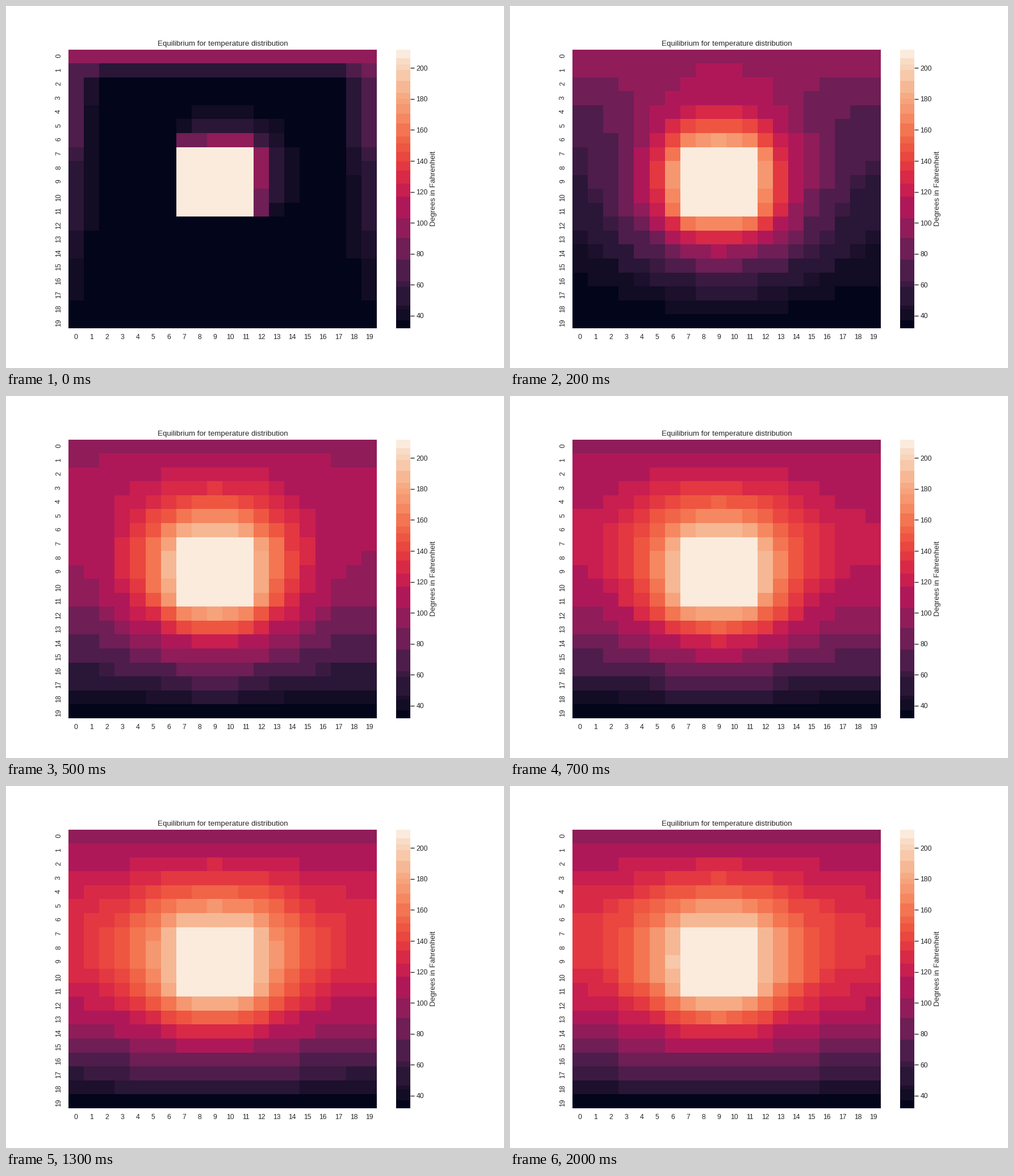
A matplotlib script for the animation above (3200 ms loop, 877x638 px).

```python
import numpy as np
import matplotlib.pyplot as plt
from matplotlib.animation import FuncAnimation
from matplotlib.colors import ListedColormap, to_rgb

W, H, DPI = 877, 638, 80
N = 20                        # plate is N x N cells
COLD, WARM, HOT = 32, 100, 212
FRAMES, INTERVAL = 32, 100
SWEEPS_PER_FRAME, LAST_MOVING = 10, 20
INK = "#262626"

plt.rcParams.update({
    "font.family": "Liberation Sans",
    "text.color": INK,
    "axes.labelcolor": INK,
    "xtick.color": INK,
    "ytick.color": INK,
    "axes.titlesize": 12,
    "axes.labelsize": 12,
    "xtick.labelsize": 11,
    "ytick.labelsize": 11,
})


def banded_cmap():
    """Dark violet to cream ramp, flattened into uneven bands."""
    stops = {
        0: "#03051a", 23.2: "#221331", 36.4: "#35193e", 46.4: "#451c47",
        69.5: "#691f55", 72.9: "#701f57", 92.7: "#921c5b", 109.3: "#ad1759",
        115.9: "#b91657", 139.1: "#d92847", 145.7: "#e13342",
        162.3: "#ed503e", 182.1: "#f37651", 185.5: "#f47d57",
        208.6: "#f6a47c", 218.6: "#f6b48f", 231.8: "#f7c9aa", 255: "#faebdd",
    }
    rgb = np.array([to_rgb(c) for c in stops.values()])
    ramp = np.column_stack(
        [np.interp(np.arange(256), list(stops), ch) for ch in rgb.T])
    edges = [0, 7, 17, 21, 38, 43, 63, 83, 101, 121, 133, 145, 153, 162,
             170, 176, 188, 197, 206, 211, 216, 227, 237, 242, 248, 256]
    bands = ramp.copy()
    for a, b in zip(edges, edges[1:]):
        bands[a:b] = ramp[a:b].mean(axis=0)
    bands[:edges[1]] = ramp[0]
    bands[edges[-2]:] = ramp[-1]
    return ListedColormap(bands)


def start_plate():
    u = np.full((N, N), float(COLD))
    u[:, 0] = u[:, -1] = np.linspace(WARM, COLD, N)
    u[0] = WARM
    return u.tolist()


def sweep(u):
    """One in-place relaxation pass, bottom to top; the sides wrap around."""
    for i in range(N - 2, 0, -1):
        for j in range(N):
            if 7 <= i <= 11 and 7 <= j <= 11:
                u[i][j] = HOT
            else:
                u[i][j] = (u[i - 1][j] + u[i + 1][j]
                           + u[i][j - 1] + u[i][(j + 1) % N]) / 4


def solve():
    u = start_plate()
    sweep(u)
    states = [np.array(u)]
    for _ in range(LAST_MOVING):
        for _ in range(SWEEPS_PER_FRAME):
            sweep(u)
        states.append(np.array(u))
    return states


states = solve()

fig, ax = plt.subplots(figsize=(W / DPI, H / DPI), dpi=DPI, facecolor="white")
mesh = ax.pcolormesh(states[0], cmap=banded_cmap(), vmin=COLD, vmax=HOT)
ax.set(xlim=(0, N), ylim=(N, 0),
       title="Equilibrium for temperature distribution")
ax.spines[:].set_visible(False)

centers = np.arange(N) + 0.5
ax.set_xticks(centers, range(N))
ax.set_yticks(centers, range(N), rotation="vertical")
ax.tick_params(length=6, pad=3.5, bottom=False, left=False)

bar = fig.colorbar(mesh, ax=ax, ticks=range(40, 201, 20))
bar.outline.set_linewidth(0)
bar.ax.tick_params(length=6, width=1.25, pad=3.5)
bar.set_label("Degrees in Fahrenheit")


def draw(k):
    mesh.set_array(states[min(k, LAST_MOVING)])
    return [mesh]


anim = FuncAnimation(fig, draw, frames=FRAMES, interval=INTERVAL,
                     repeat=True, repeat_delay=0, blit=False)
plt.show()
```
